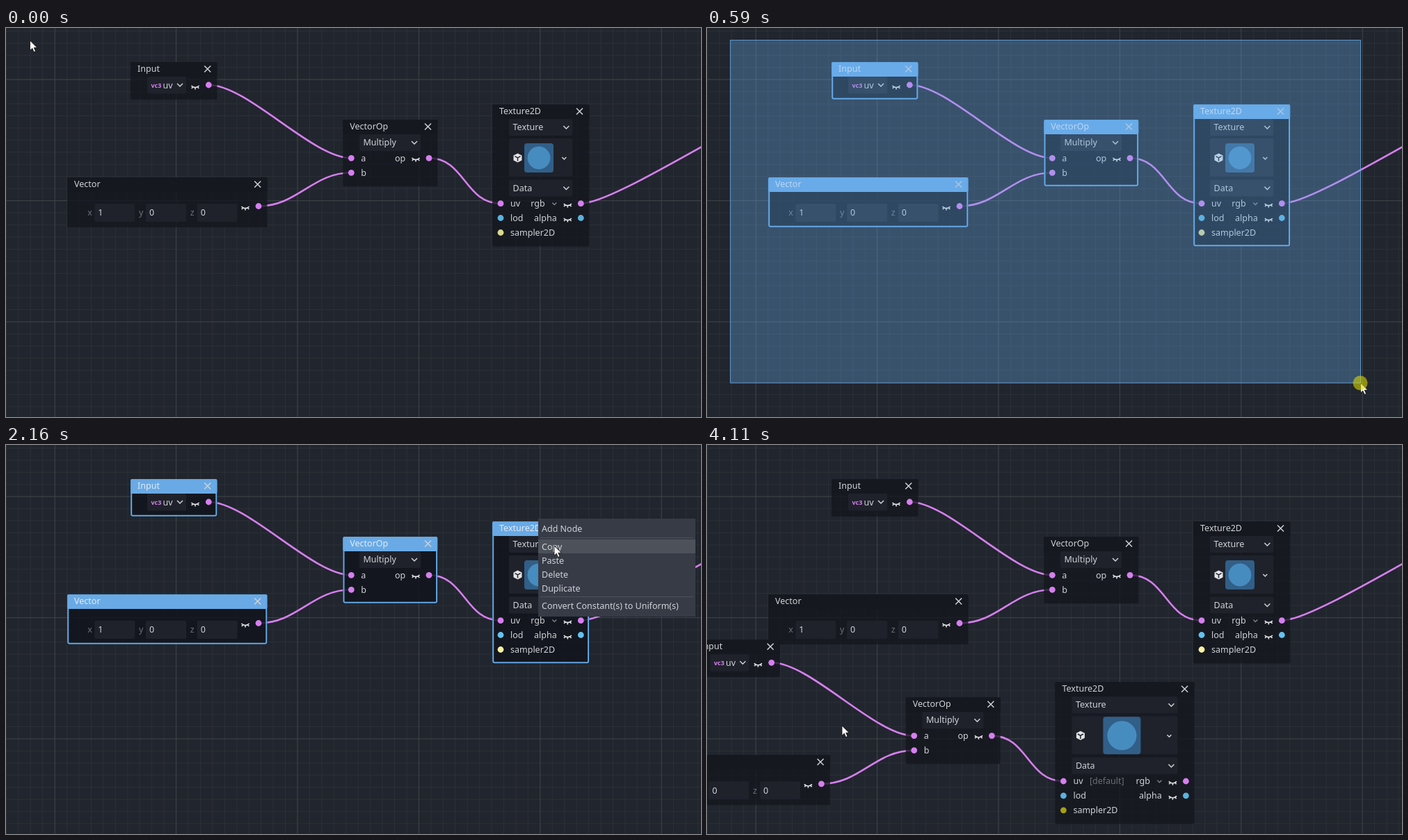
Write an HTML page that moves like this. It is 999 by 560 pixels and loops after 4630 ms.

```html
<!DOCTYPE html>
<html lang="en">
<head>
<meta charset="utf-8">
<title>Copy and paste nodes</title>
<style>
  html, body { margin: 0; width: 100%; height: 100%; overflow: hidden; background: #21252d; }
  svg { display: block; }
  text { font: 12.5px "Noto Sans", sans-serif; fill: #d0d3d7; white-space: pre; }
  text.dim { fill: #6b6f77; }
  text.type { font-size: 9px; font-weight: 800; fill: #d67fef; }
  .minor { stroke: #2c3038; }
  .major { stroke: #40444b; }
  .body { fill: rgb(20 23 31 / .8); }
  .head { fill: #15181f; }
  .rim { fill: none; stroke: #64a8e4; stroke-width: 2; visibility: hidden; }
  .on .body { fill: rgb(17 20 29 / .86); }
  .on .head { fill: #69aae6; }
  .on .rim { visibility: visible; }
  .on .title { fill: #e3ebf3; }
  .field { fill: #1f222b; }
  .icon { fill: none; stroke: #cfd2d6; stroke-width: 1.5; }
  .icon.dim { stroke: #7c8087; }
  .eye { fill: none; stroke: #e2e4e6; stroke-width: 1.6; }
  .link { fill: none; stroke: #d67fef; stroke-width: 2.6; }
  .vec { fill: #d67fef; }
  .num { fill: #5ab2de; }
  .tex { fill: #dcd98d; }
  .bright .num { fill: #64c2f0; }
  .bright .tex { fill: #f8f2a2; }
  .copy .num { fill: #5ab2de; }
  .copy .tex { fill: #a5a016; }
  #box { fill: rgb(105 174 237 / .33); stroke: #6aaeea; stroke-opacity: .8; }
  .menu { fill: #363b46; }
  .rule { stroke: #4b505a; }
  .hover { fill: #4d5159; }
</style>
</head>
<body>
<svg id="stage" width="999" height="560" viewBox="0 0 999 560"></svg>
<script>
const LOOP = 4630, TITLE_H = 21;

// ---- drawing helpers
const rect = (cls, x, y, w, h, r = 0) =>
  `<rect class="${cls}" x="${x}" y="${y}" width="${w}" height="${h}" rx="${r}"/>`;
const text = (x, y, s, cls = "") => `<text class="${cls}" x="${x}" y="${y}">${s}</text>`;
const path = (cls, x, y, d) => `<path class="${cls}" transform="translate(${x} ${y})" d="${d}"/>`;
const dot = (cls, x, y) => `<circle class="${cls}" cx="${x}" cy="${y}" r="4.4"/>`;
const chevron = (x, y, cls = "") => path("icon " + cls, x, y, "M-4-2 0 2 4-2");
const smallChevron = (x, y, cls = "") => path("icon " + cls, x, y, "M-3-1.5 0 1.5 3-1.5");
const eye = (x, y) => path("eye", x, y, "M-5.6-2Q0 3.4 5.6-2M-3.6 0l-1.6 1.9M0 .8v2.6M3.6 0l1.6 1.9");

function link(x1, y1, x2, y2) {
  const c = Math.min(56, (x2 - x1) / 2);
  return `<path class="link" d="M${x1} ${y1}C${x1 + c} ${y1} ${x2 - c} ${y2} ${x2} ${y2}"/>`;
}

function node(x, y, w, h, title, content) {
  return `<g class="node" data-x="${x}" data-y="${y}">` +
    rect("body", x, y, w, h, 2) + rect("head", x, y, w, TITLE_H, 2) +
    rect("rim", x + 1.2, y + 1, w - 2.4, h - 2.2, 2) +
    text(x + 10, y + 14, title, "title") +
    path("icon", x + w - 13.8, y + 10, "M-4.5-4.5 4.5 4.5M4.5-4.5-4.5 4.5") +
    content + "</g>";
}

const picker = (x, y, w, label) =>
  rect("field", x, y, w, 24, 2) + text(x + 5.5, y + 16, label) + chevron(x + w - 9, y + 12);

// ---- nodes
const input = () => node(179, 49, 124.5, 54, "Input",
  rect("field", 203, 70, 56, 24.5, 2) + text(208.5, 85.5, "vc3", "type") + text(225.5, 86.5, "uv") +
  chevron(250, 82) + eye(272, 85) + dot("vec", 291.3, 82));

const vectorOp = () => node(484.3, 132, 136, 96, "VectorOp",
  picker(508, 153, 88, "Multiply") +
  text(510.3, 191.5, "a") + text(510.3, 212.5, "b") + text(559, 191.5, "op") + eye(589, 189) +
  dot("vec", 496.3, 187.3) + dot("vec", 496.3, 208.3) + dot("vec", 608, 187.3));

const vector = () => node(88, 215, 287.5, 72, "Vector",
  ["x1", "y0", "z0"].map(([axis, value], i) => {
    const x = 117.3 + i * 73.7;
    return text(x, 270.3, axis, "dim") + rect("field", x + 10, 253, 58, 26, 2) + text(x + 15, 270.3, value);
  }).join("") + eye(344, 259) + dot("vec", 363, 256.5));

function texture(w, size, note = "") {
  const x = 699, r = x + w, fw = w - 48, cx = x + 25 + (fw - 6) / 2;
  const tx = w > 150 ? cx - size / 2 - 2 : 745;
  const cube = path("", 735.5, 187, "M0-6.5 6-3.5V3.5L0 6.5-6 3.5V-3.5Z")
    .replace("<path", '<path fill="#e2e4e6"') +
    path("", 735.5, 187, "M-4-2.3 0 0 4-2.3M0 0V4.6").replace("<path", '<path fill="none" stroke="#1f222b" stroke-width="1.5"');
  return node(x, 110, w, 204.5, "Texture2D",
    picker(723, 131, fw, "Texture") +
    rect("field", 723, 159, fw, 55, 2) + cube +
    `<rect x="${tx}" y="${187 - size / 2}" width="${size}" height="${size}" rx="4" fill="#315f88"/>` +
    `<circle cx="${tx + size / 2}" cy="187" r="${size * .39}" fill="#478cbf"/>` +
    smallChevron(r - 36, 187.5) + picker(723, 218.5, fw, "Data") +
    text(725, 257, "uv") + text(748.5, 257, note, "dim") + text(r - 84, 257, "rgb") +
    smallChevron(r - 50, 253, "dim") + eye(r - 31, 255) + dot("vec", 711, 252.7) + dot("vec", r - 12, 252.7) +
    text(725, 277.7, "lod") + text(r - 79.3, 277.7, "alpha") + eye(r - 31, 276) +
    dot("num", 711, 273.5) + dot("num", r - 12, 273.5) +
    text(725, 298.5, "sampler2D") + dot("tex", 711, 294.5));
}

const wires = () => link(291.3, 82, 496.3, 187.3) + link(363, 256.5, 496.3, 208.3) +
  link(608, 187.3, 711, 252.7);

function grid() {
  const cell = 17.44, first = { x: 70.2 - 5 * cell, y: 74.2 - 5 * cell };
  const lines = { minor: "", major: "" };
  for (let i = 0; i < 60; i++) {
    const kind = i % 10 === 5 ? "major" : "minor";
    lines[kind] += `M${first.x + i * cell} 0v560M0 ${first.y + i * cell}h999`;
  }
  return `<path class="minor" d="${lines.minor}"/><path class="major" d="${lines.major}"/>`;
}

// ---- context menu
const ITEMS = ["Add Node", "Copy", "Paste", "Delete", "Duplicate", "Convert Constant(s) to Uniform(s)"];
const ITEM_Y = [14, 40, 60, 80, 100, 125];

function menu(id, x, y, w, count) {
  const rule = dy => `<path class="rule" d="M${x + 3} ${y + dy}h${w - 6}"/>`;
  return `<g id="${id}" data-y="${y}">` + rect("menu", x, y, w, count > 5 ? 141 : 116) + rule(27.5) +
    (count > 5 ? rule(112.5) : "") + rect("hover", x, y, w, 20) +
    ITEMS.slice(0, count).map((s, i) => text(x + 5, y + ITEM_Y[i] + 4.5, s)).join("") + "</g>";
}

const stage = document.getElementById("stage");
stage.innerHTML = grid() +
  `<g id="graph">${wires()}${link(826, 252.7, 1174, 89)}` +
  `<g id="nodes">${input()}${vectorOp()}${vector()}${texture(139.3, 42)}</g>` +
  `<g id="pasted" class="copy" transform="translate(-198.6 231.3)">${wires()}` +
  `${input()}${vectorOp()}${vector()}${texture(200, 54, "[default]")}</g></g>` +
  `<rect id="box" x="33.5" y="17.5"/>` +
  menu("menuA", 765, 106, 226, 6) + menu("menuB", 165, 338, 91, 5) +
  `<path id="cursor" d="M0 0V14.2L3.3 11.2 5.6 16.5 8 15.4 5.7 10.3H10.2Z" fill="#fff" stroke="#111" stroke-width=".8"/>` +
  `<circle id="press" r="10.5"/>`;

const $ = id => document.getElementById(id);
const nodes = [...$("nodes").children];

// ---- timing
const smooth = p => p * p * (3 - 2 * p);
const out = p => 1 - (1 - p) ** 1.7;
const START = { x: 34.5, y: 18 };
const MOVES = [
  { from: 200, to: 590, n: 7, x: 939.5, y: 511, bx: 6, by: 45, ease: smooth },
  { from: 790, to: 1260, n: 8, x: 798, y: 131, ease: smooth },
  { from: 1320, to: 1390, n: 2, x: 729, y: 130, ease: smooth },
  { from: 1470, to: 1470, n: 1, x: 765, y: 126, ease: smooth },
  { from: 1880, to: 2160, n: 5, x: 788, y: 145, ease: smooth },
  { from: 2500, to: 3160, n: 11, x: 165, y: 359, by: 56, ease: out },
  { from: 3490, to: 3820, n: 6, x: 194, y: 404, ease: smooth }
];
const LEFT = [[200, 790], [2430, 2500], [3160, 3230], [4020, 4110]];
const RIGHT = [[1610, 1680], [3360, 3490]];

const within = (t, spans) => spans.some(([a, b]) => t >= a && t < b);
const show = (el, on) => el.style.display = on ? "" : "none";

function along(a, m, p) {
  const e = m.ease(p), arc = 4 * e * (1 - e);
  return {
    x: a.x + (m.x - a.x) * e + (m.bx || 0) * arc,
    y: a.y + (m.y - a.y) * e + (m.by || 0) * arc
  };
}

// The pointer is sampled in even steps, as a screen recorder would.
function progress(m, t) {
  const step = Math.max(1, (m.to - m.from) / Math.max(1, m.n - 1));
  return Math.min(m.n, Math.floor((t - m.from) / step + .1) + 1) / m.n;
}

function pointer(t) {
  let pos = START;
  for (const m of MOVES) if (t >= m.from) pos = along(pos, m, progress(m, t));
  return pos;
}

function drawMenu(el, open, hovering, y) {
  show(el, open);
  const top = +el.dataset.y, hover = el.querySelector(".hover");
  const item = ITEM_Y.find(c => Math.abs(y - top - c) < 10);
  show(hover, hovering && item !== undefined);
  if (item !== undefined) hover.setAttribute("y", top + item - 10);
}

function render(t) {
  const at = pointer(t);
  $("cursor").setAttribute("transform", `translate(${at.x} ${at.y})`);

  const left = within(t, LEFT), right = within(t, RIGHT), press = $("press");
  show(press, left || right);
  press.setAttribute("cx", at.x - .5);
  press.setAttribute("cy", at.y);
  press.setAttribute("fill", left ? "rgb(215 212 5 / .6)" : "rgb(220 5 7 / .6)");

  // The selection box trails the pointer a little while it moves.
  const dragging = t >= 200 && t < 790, box = $("box");
  let corner = at;
  if (dragging) {
    const p = progress(MOVES[0], t);
    corner = along(START, MOVES[0], p < 1 ? p - .06 : 1);
    box.setAttribute("width", Math.max(0, corner.x - 33.5));
    box.setAttribute("height", Math.max(0, corner.y - 17.5));
  }
  show(box, dragging);

  for (const n of nodes) {
    const reached = corner.x > n.dataset.x && corner.y > n.dataset.y;
    n.classList.toggle("on", dragging ? reached : t >= 790 && t < 3160);
  }
  $("graph").classList.toggle("bright", t >= 790);
  show($("pasted"), t >= 4110);
  drawMenu($("menuA"), t >= 1680 && t < 2500, t >= 1880, at.y);
  drawMenu($("menuB"), t >= 3430 && t < 4110, t >= 3490, at.y);
}

const begin = performance.now();
function tick(now) {
  render(Math.max(0, now - begin) % LOOP);
  requestAnimationFrame(tick);
}
render(0);
requestAnimationFrame(tick);
</script>
</body>
</html>
```
